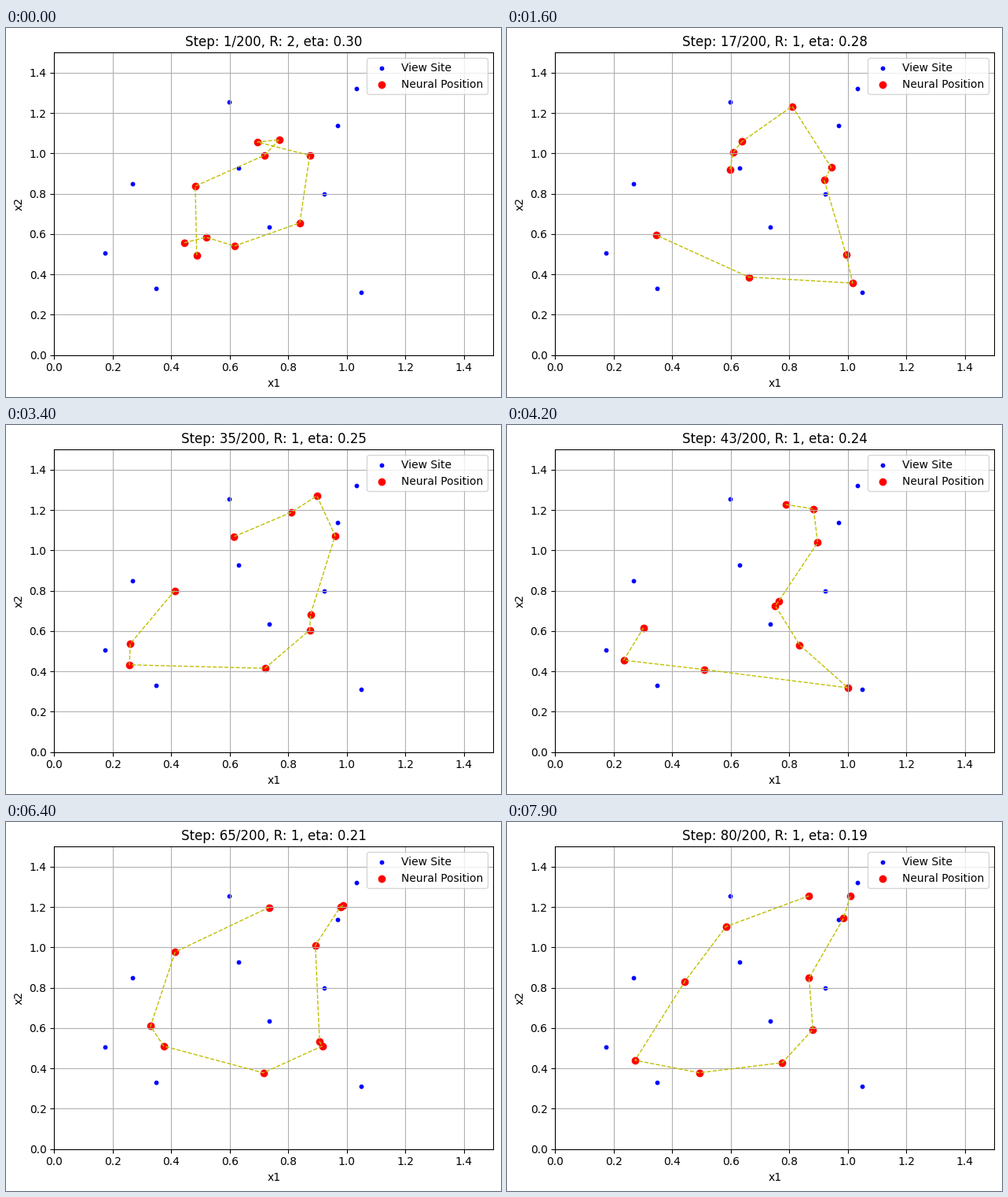
A matplotlib script for the animation above (8000 ms loop, 630 by 469 pixels).

```python
import numpy as np
import matplotlib.pyplot as plt
from matplotlib.animation import FuncAnimation

W, H, DPI = 630, 469, 100
LEFT, BOTTOM, AX_W, AX_H = 61.3, 53.3, 558.8, 384.5
LIMIT = 1.5
FRAMES, STEPS = 80, 200

SITES = np.array([
    (0.173, 0.506), (0.347, 0.331), (0.267, 0.850), (0.597, 1.255),
    (0.629, 0.928), (0.734, 0.635), (0.922, 0.799), (0.967, 1.138),
    (1.032, 1.322), (1.048, 0.311)])

START = np.array([
    (0.487, 0.495), (0.482, 0.838), (0.718, 0.990), (0.769, 1.068),
    (0.694, 1.056), (0.873, 0.990), (0.839, 0.655), (0.616, 0.541),
    (0.519, 0.584), (0.444, 0.557)])


def eta(k):
    return 0.3 - 0.0014 * k


def radius(k):
    return int(2 - k / STEPS)


def train_step(chain, k, rng):
    """One round of self-organising map updates on randomly drawn sites."""
    chain = chain.copy()
    n = len(chain)
    for site in rng.choice(SITES, n):
        win = np.argmin(((chain - site) ** 2).sum(axis=1))
        # Wraps below the first neuron, stops after the last
        near = [j for j in range(win - radius(k), win + radius(k) + 1) if j < n]
        chain[near] += eta(k) * (site - chain[near])
    return chain


def train(seed):
    rng = np.random.default_rng(seed)
    path = [START]
    for k in range(1, FRAMES):
        path.append(train_step(path[-1], k, rng))
    return path


PATH = train(seed=0)

fig = plt.figure(figsize=(W / DPI, H / DPI), dpi=DPI)
ax = fig.add_axes([LEFT / W, BOTTOM / H, AX_W / W, AX_H / H])
ax.scatter(*SITES.T, s=10, c="b", label="View Site")
neurons = ax.scatter(*START.T, s=36, c="r", label="Neural Position")
link, = ax.plot(*START.T, "y--", lw=1)
ax.set(xlim=(0, LIMIT), ylim=(0, LIMIT), xlabel="x1", ylabel="x2")
ax.set_xticks(np.arange(0, LIMIT, 0.2))
ax.set_yticks(np.arange(0, LIMIT, 0.2))
ax.grid(True)
ax.legend(loc="upper right")
title = ax.set_title("")


def draw(k):
    neurons.set_offsets(PATH[k])
    link.set_data(*PATH[k].T)
    title.set_text(f"Step: {k + 1}/{STEPS}, R: {radius(k)}, eta: {eta(k):.2f}")
    return neurons, link, title


anim = FuncAnimation(fig, draw, frames=FRAMES, interval=100,
                     repeat=True, repeat_delay=0, blit=False)
plt.show()
```
